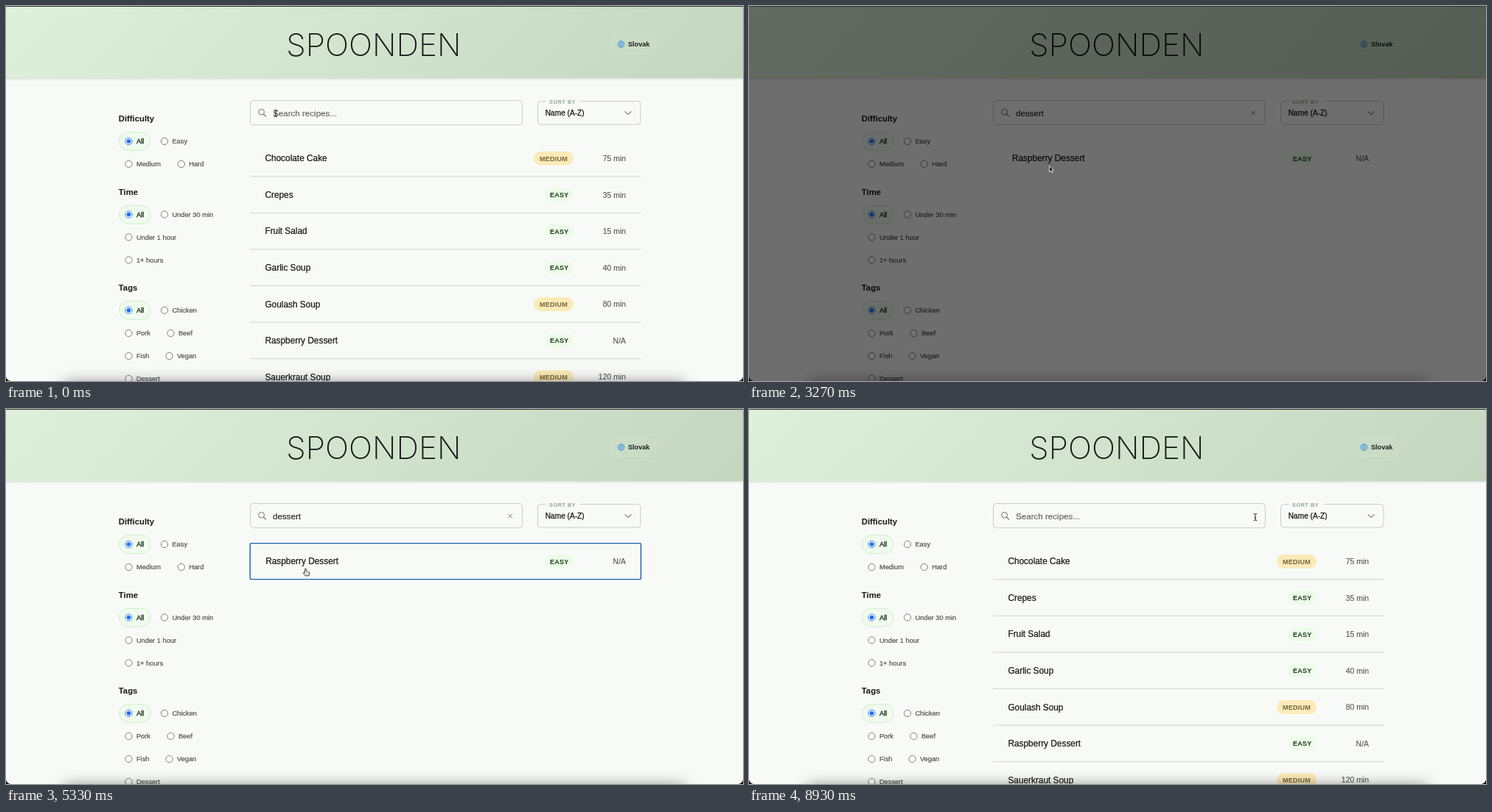
Recreate the animation shown at these times as an HTML page. Size 1000 px wide and 510 px high, loop 9 s.

```html
<!DOCTYPE html>
<html lang="en">
<head>
<meta charset="utf-8">
<title>Recipe search</title>
<style>
  html, body { margin: 0; width: 100%; height: 100%; overflow: hidden; background: #f8faf8; }
  #stage { position: relative; width: 1000px; height: 510px; overflow: hidden; background: #f8faf8; }
  #stage > * { position: absolute; }
  #header {
    left: 0; top: 0; width: 1000px; height: 97.5px;
    background: linear-gradient(135deg, #dff1dc, #c4d6bf);
    box-shadow: 0 1px 3px rgba(0, 0, 0, .16);
  }
  svg { left: 0; top: 0; display: block; }
  text { font-family: "Liberation Sans", Arial, sans-serif; white-space: pre; }
  #shade { left: 0; top: 0; width: 1000px; height: 510px; background: rgba(0, 0, 0, .56); }
  #panel { left: 735px; top: 0; width: 265px; height: 510px; background: #fdfdfd; }
  #topline { left: 0; top: 0; width: 1000px; height: 1px; background: #333533; }
  #dock {
    left: 82px; top: 515px; width: 836px; height: 20px;
    box-shadow: 0 0 20px 2px rgba(0, 0, 0, .5);
  }
</style>
</head>
<body>
<div id="stage">
  <div id="header"></div>
  <svg id="page" width="1000" height="510"></svg>
  <div id="shade"></div>
  <div id="panel"></div>
  <div id="dock"></div>
  <div id="topline"></div>
  <svg id="top" width="1000" height="510">
    <path d="M0 504V510H6Q0.8 509.2 0 504ZM1000 504V510H994Q999.2 509.2 1000 504Z"/>
    <g id="arrow">
      <path d="M0 0V8.2L1.9 6.5L3.2 9.3L4.6 8.7L3.4 6H5.9Z" fill="#111" stroke="#fff" stroke-width=".8"/>
    </g>
    <g id="hand">
      <path d="M-1.9 1V-3.9Q-1.9 -5 -1 -5T-.1 -3.9V-1.2Q1.3 -1.9 1.6 -.8Q2.8 -1.2 3.1 -.2Q4.4 -.5 4.4 .8V2.3
        Q4.4 3.4 3.5 4.8H-1.6Q-2.4 3.4 -4 1.3Q-4.4 .3 -3.3 .2Z" fill="#fff" stroke="#222" stroke-width=".9"/>
      <path d="M0 1.2V3.4M1.5 1.2V3.4M3 1.2V3.4" stroke="#555" stroke-width=".5"/>
    </g>
    <g id="beam" fill="none">
      <path d="M-2.2 -4.6Q0 -4.6 0 -3.4Q0 -4.6 2.2 -4.6M0 -3.4V3.4M-2.2 4.6Q0 4.6 0 3.4Q0 4.6 2.2 4.6M-1.2 1H1.2"
        stroke="#222" stroke-width="1"/>
    </g>
  </svg>
</div>
<script>
const LOOP = 9000;
const $ = id => document.getElementById(id);
const page = $('page');

function add(tag, attrs, parent = page, content) {
  const el = document.createElementNS('http://www.w3.org/2000/svg', tag);
  for (const k in attrs) el.setAttribute(k, attrs[k]);
  if (content) el.textContent = content;
  return parent.appendChild(el);
}
// weight: 'bold', or the stroke width that thickens the regular face
function label(x, y, content, size, fill, weight = 0, extra = {}, parent = page) {
  const face = weight === 'bold' ? { 'font-weight': 700 } : { stroke: fill, 'stroke-width': weight };
  return add('text', { x, y, 'font-size': size, fill, ...face, ...extra }, parent, content);
}
const box = (x, y, width, height, rx, attrs, parent) =>
  add('rect', { x, y, width, height, rx, fill: 'none', ...attrs }, parent);
const line = (d, stroke, width = 1, parent) =>
  add('path', { d, stroke, 'stroke-width': width, fill: 'none' }, parent);
const show = (el, on) => { el.style.display = on ? '' : 'none'; };

// Header
add('text', {
  x: 499, y: 68.4, 'font-size': 42.5, 'text-anchor': 'middle', fill: '#141a14',
  style: 'font-family: Inter, Roboto, sans-serif; font-weight: 200'
}, page, 'SPOONDEN');
box(821.5, 40.5, 60, 24, 4, { fill: 'rgba(255,255,255,.04)', stroke: 'rgba(255,255,255,.12)' });
add('circle', { cx: 834.6, cy: 52, r: 4.5, fill: '#a9d3ea', stroke: '#5b9cc2', 'stroke-width': .8 });
line('M830 52H839M834.6 47.5V56.5M831 49.6H838M831 54.4H838', '#5b9cc2', .6);
add('ellipse', { cx: 834.6, cy: 52, rx: 2.2, ry: 4.5, fill: 'none', stroke: '#5b9cc2', 'stroke-width': .6 });
label(844, 55.3, 'Slovak', 9.15, '#1b211b', 'bold');

// Sidebar filters
function option(x, y, name) {
  const all = name === 'All';
  if (all) box(153.4, y - 12.3, 42.8, 24.8, 12.4, { fill: '#effbec', stroke: '#d3edce' });
  add('circle', {
    cx: x, cy: y, r: 4.6, fill: '#fff', stroke: all ? '#1c6cf0' : '#6f716f', 'stroke-width': .9
  });
  if (all) add('circle', { cx: x, cy: y, r: 2.8, fill: '#1c6cf0' });
  label(x + 10.4, y + 3.4, name, all ? 9.5 : 9.3, all ? '#1d2a1d' : '#4d524d', all ? .35 : .2);
}
const FILTERS = [
  ['Difficulty', 157, [[166.5, 184, 'All'], [215, 184, 'Easy'], [166.5, 215, 'Medium'], [237.8, 215, 'Hard']]],
  ['Time', 256.5, [[166.5, 283.5, 'All'], [215, 283.5, 'Under 30 min'], [166.5, 314.4, 'Under 1 hour'],
    [166.5, 345.4, '1+ hours']]],
  ['Tags', 386.7, [[166.5, 413.8, 'All'], [215, 413.8, 'Chicken'], [166.5, 445, 'Pork'], [223.5, 445, 'Beef'],
    [166.5, 476, 'Fish'], [221.5, 476, 'Vegan'], [166.5, 507, 'Dessert']]]
];
for (const [title, y, options] of FILTERS) {
  label(152.8, y, title, 11.3, '#141814', 'bold');
  options.forEach(o => option(...o));
}

// Search field and sort menu
const field = box(331.5, 128.5, 369, 33.2, 4, { stroke: '#c8cec8' });
const ring = box(330.6, 127.6, 370.8, 35, 5, { stroke: '#8fa38b', 'stroke-width': 1.4 });
add('circle', { cx: 346.6, cy: 144.2, r: 3.9, fill: 'none', stroke: '#6c746c' });
line('M349.4 147L353 150.6', '#6c746c', 1.1);
const input = label(362, 149.8, '', 11.6, '#1b1f1b', .12);
const caret = line('M0 139V152', '#111');
const clear = line('M681.3 142.6L686.9 148.2M686.9 142.6L681.3 148.2', '#777d77');
box(721.5, 129.5, 139.5, 31.6, 4, { stroke: '#c8cec8' });
line('M733 129.5H779', '#f8faf8', 3);
label(737, 132.5, 'SORT BY', 7.3, '#93a591', 'bold', { 'letter-spacing': .55 });
label(731.8, 149.2, 'Name (A-Z)', 10.15, '#161a16', .28);
line('M839.8 143.3L844.2 147.6L848.6 143.3', '#6c746c', 1.1);

// Recipe list
const RECIPES = [
  ['Chocolate Cake', 'MEDIUM', '75 min'], ['Crepes', 'EASY', '35 min'], ['Fruit Salad', 'EASY', '15 min'],
  ['Garlic Soup', 'EASY', '40 min'], ['Goulash Soup', 'MEDIUM', '80 min'],
  ['Raspberry Dessert', 'EASY', 'N/A'], ['Sauerkraut Soup', 'MEDIUM', '120 min']
];
const ROW = 49.58;
const rows = RECIPES.map(([name, level, time]) => {
  const g = add('g', {});
  const medium = level === 'MEDIUM', width = medium ? 54 : 38.5;
  const title = label(351.4, 211.3, name, 11.85, '#151915', .22, {}, g);
  box(770 - width, 197.8, width, 18.8, 9.4, { fill: medium ? '#fcebb8' : '#ecfce8' }, g);
  label(770 - width / 2, 210.5, level, 9.1, medium ? '#76673a' : '#1f3a20', 'bold',
    { 'letter-spacing': .2, 'text-anchor': 'middle' }, g);
  label(841, 211, time, 10.45, '#565b56', .15, { 'text-anchor': 'end' }, g);
  return { name: name.toLowerCase(), g, title, rule: line('M331 231.8H861.5', '#d0d4d0', 1, g) };
});
const outline = box(331.2, 182.6, 530.3, 49, 1.5, { stroke: '#1c5fa8', 'stroke-width': 1.4 });

// Timeline
const KEYS = [[1130, 'd'], [1330, 'de'], [1500, 'des'], [1660, 'dess'], [2050, 'desse'], [2200, 'desser'], [2390, 'dessert']];
const FOCUS = 830, OPEN = 3240, CLOSE = 4916, CLOSED = 5270, CLEARED = 7270;
const PATH = [[0, 366, 146], [2600, 366, 146], [2950, 407.5, 222], [5500, 407.5, 222], [6250, 687, 147], [LOOP, 687, 147]];
const HOVERS = [[2770, 3275], [CLOSED, 5865]];

const part = (t, start, length) => Math.min(1, Math.max(0, (t - start) / length));
const smooth = p => p * p * (3 - 2 * p);
const easeOut = p => 1 - (1 - p) ** 2.4;

function pointer(t) {
  const i = PATH.findIndex((p, n) => n && t <= p[0]);
  const [t0, x0, y0] = PATH[i - 1], [t1, x1, y1] = PATH[i];
  const p = smooth(part(t, t0, t1 - t0));
  return [x0 + (x1 - x0) * p, y0 + (y1 - y0) * p];
}

function drawList(t, query) {
  const found = rows.filter(r => r.name.includes(query));
  const shift = 5.5 * HOVERS.reduce((sum, [on, off]) =>
    sum + smooth(part(t, on, 250)) - smooth(part(t, off, 250)), 0);
  for (const r of rows) {
    const i = found.indexOf(r);
    show(r.g, i >= 0);
    r.g.setAttribute('transform', `translate(0 ${i * ROW})`);
    show(r.rule, i < found.length - 1);
    r.title.setAttribute('x', 351.4 + (query ? shift : 0));
  }
}

function drawSearch(t, query, lastKey) {
  const focused = t >= FOCUS && t < OPEN;
  show(ring, focused);
  show(field, !focused);
  show(clear, query);
  input.textContent = query || 'Search recipes...';
  input.setAttribute('fill', query ? '#1b1f1b' : '#6b726b');
  const end = query ? input.getComputedTextLength() : 0;
  caret.setAttribute('transform', `translate(${362.6 + end} 0)`);
  show(caret, focused && (t - lastKey) % 1000 < 500);
}

function drawPointer(t, query, covered) {
  const [x, y] = pointer(t);
  const kind = covered ? 'arrow' : y >= 182 ? 'hand' : y > 162 ? 'arrow' : query && x > 677 ? 'hand' : 'beam';
  const visible = t < KEYS[0][0] || t > 2560;
  for (const id of ['arrow', 'hand', 'beam']) {
    show($(id), visible && id === kind);
    $(id).setAttribute('transform', `translate(${x} ${id === 'arrow' ? y - 4.6 : y})`);
  }
}

function draw(t) {
  const typed = KEYS.filter(k => k[0] <= t).pop();
  const query = typed && t < CLEARED ? typed[1] : '';
  const covered = t >= OPEN && t < CLOSED;
  drawSearch(t, query, typed ? typed[0] : FOCUS);
  drawList(t, query);
  show(outline, t >= CLOSED && t < CLEARED);
  show($('shade'), covered);
  $('shade').style.backdropFilter = `blur(${1.1 * part(t, 3275, 100)}px)`;
  const away = 1 - easeOut(part(t, 3272, 300)) + easeOut(part(t, CLOSE, 300));
  show($('panel'), covered && away < 1);
  $('panel').style.transform = `translateX(${265 * away}px)`;
  drawPointer(t, query, covered);
}

const start = performance.now();
function tick() {
  draw((performance.now() - start) % LOOP);
  requestAnimationFrame(tick);
}
tick();
</script>
</body>
</html>
```
